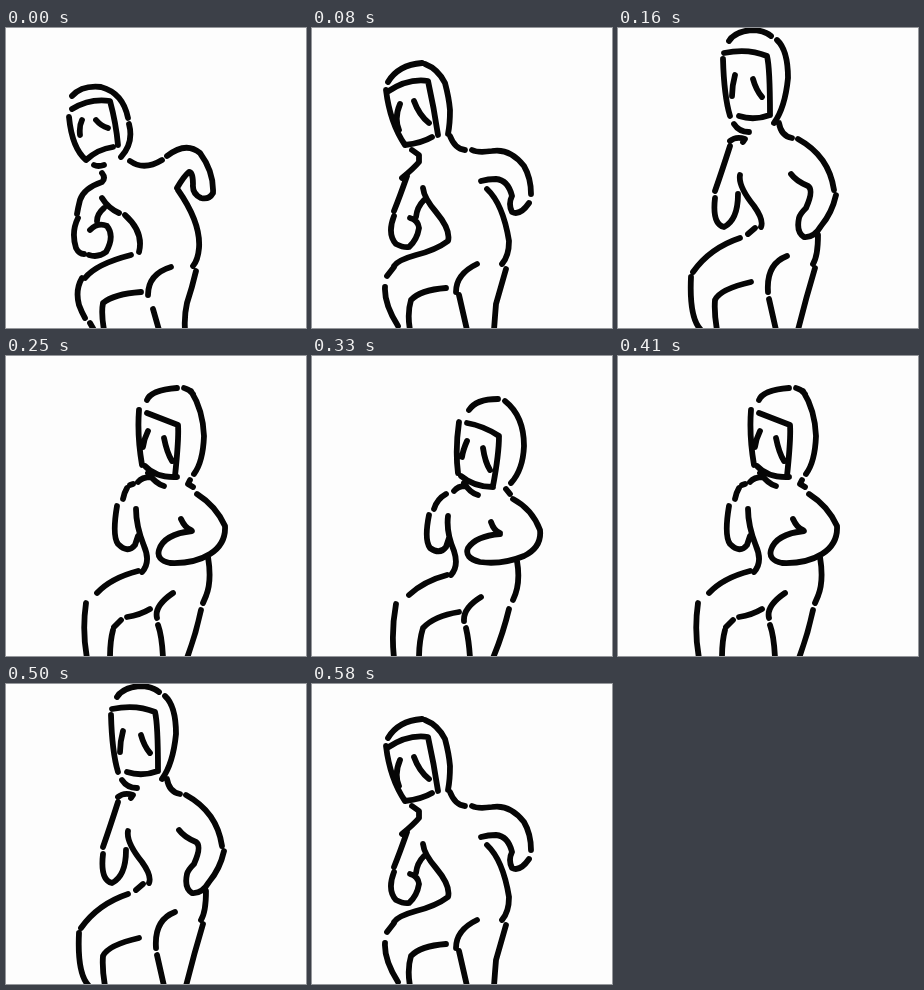
An HTML page for the animation above (0.66 s loop, 300x300 px).

```html
<!DOCTYPE html>
<html lang="en">
<head>
<meta charset="utf-8">
<title>Dancer</title>
<style>
  html, body { margin: 0; width: 100%; height: 100%; overflow: hidden; background: #fdfdfd; }
  svg { display: block; width: 100%; height: 100%; }
  path { fill: none; stroke: #060606; stroke-width: 5.8; stroke-linecap: round; stroke-linejoin: round; }
</style>
</head>
<body>
<svg viewBox="0 0 300 300"><path id="figure"/></svg>
<script>
const join = (...strokes) => strokes.join(' ');

// Each pose: head, arms and torso, legs.
const poses = [
  join(
    'M66 68Q76 57 95 59Q117 65 122 90M123 96Q128 115 115 129',
    'M66 81Q84 70 104 73Q110 95 112 117M63 89Q66 120 80 132Q92 121 107 119',
    'M76 92Q73 98 74 107M90 92Q95 98 102 100M88 137Q92 139 98 137',
    'M96 145Q100 150 96 154Q78 160 74 172Q72 180 71 186M72 190Q65 204 70 220Q73 226 78 226',
    'M84 202Q92 194 101 198Q109 208 100 224Q92 230 83 227',
    'M96 170Q102 180 113 185M98 180Q91 186 91 193M119 187Q138 204 133 224',
    'M124 133Q138 143 156 132',
    'M161 128Q180 113 194 125Q208 144 207 165Q203 172 195 170Q186 166 187 156Q187 144 183 144Q178 148 171 160',
    'M172 162Q195 195 193 220Q192 232 187 238',
    'M125 227Q90 236 79 250M76 250Q69 262 73 277Q76 285 79 290M84 295L88 302',
    'M135 264Q108 266 97 275Q95 285 98 302M165 239Q142 246 142 267M147 281L153 302',
    'M190 243Q186 260 181 275Q178 288 179 302'
  ),
  join(
    'M76 54Q86 37 110 35M113 36Q126 41 133 55Q137 70 138 82Q138 96 136 106',
    'M75 64Q96 50 116 53Q122 80 126 107M74 62Q78 95 93 117Q110 115 120 109',
    'M88 76Q82 90 87 102M102 73Q107 87 117 95M138 108Q143 121 153 122',
    'M100 122L107 127L107 134Q102 140 90 150M95 148Q88 168 82 183',
    'M82 188Q75 206 84 216Q92 220 97 219Q105 212 107 200Q106 192 98 190',
    'M111 160Q112 170 124 184Q139 202 136 213Q124 222 104 227Q86 232 82 238M82 239L75 248M112 172Q105 179 104 189',
    'M160 122Q166 125 180 123Q198 120 212 138Q219 150 219 166',
    'M217 175Q208 188 200 184Q196 176 200 168Q196 152 184 151Q176 151 169 153',
    'M175 161Q191 176 197 213Q197 228 190 236M194 241L184 276Q183 288 182 302',
    'M73 259Q72 276 86 298M134 260Q108 262 99 272Q95 285 98 302',
    'M165 236Q144 246 144 264M147 267L155 302'
  ),
  join(
    'M111 13Q116 4 133 2Q146 2 153 8M159 12Q170 22 170 50Q167 80 156 95',
    'M106 25Q130 20 149 28Q152 40 152 87M105 31Q106 68 112 88M121 88Q136 93 152 87',
    'M117 47Q114 58 114 68M135 51Q138 62 144 69',
    'M116 96Q121 104 131 104M161 95Q163 108 174 110M112 113Q118 108 127 111L125 114',
    'M112 118Q104 143 97 163M97 170Q94 196 106 199Q120 192 120 166',
    'M122 147Q120 158 136 178Q146 192 143 199M137 200L130 206',
    'M180 111Q211 128 216 162',
    'M218 167Q214 185 203 198Q196 210 186 209Q178 204 181 190Q182 186 188 180Q196 162 190 158Q178 153 173 146',
    'M200 207Q200 228 195 236M197 240Q188 270 180 302',
    'M122 210Q92 220 75 244M73 249Q71 290 83 302',
    'M133 254Q102 261 97 272Q96 285 99 302M169 228Q148 236 150 264M151 271L158 302'
  ),
  join(
    'M141 44Q145 34 171 32M178 32Q183 33 187 38M185 35Q197 54 198 80Q197 106 188 118',
    'M141 57L172 69Q173 82 169 120M133 54Q131 80 136 109M139 110Q150 122 171 121',
    'M142 75Q138 83 137 91M158 82Q161 97 166 105',
    'M142 117Q150 128 158 130M132 126Q136 121 145 121M184 124L182 128L187 131',
    'M124 129L127 128M121 132Q118 137 117 143',
    'M111 150Q106 180 112 188Q122 198 129 189L132 180',
    'M130 153Q130 170 138 190Q145 206 136 216',
    'M191 138Q210 150 219 170Q220 188 204 198Q188 208 164 207Q150 204 153 194Q158 178 186 175M175 163Q179 172 185 174',
    'M202 201Q206 225 200 240L197 247M195 254Q190 278 181 302',
    'M132 215Q105 222 91 237M80 247Q76 275 81 302',
    'M144 253Q134 259 121 261M115 264L108 271M107 274Q104 285 104 302',
    'M167 237Q148 250 151 262M152 269Q156 280 157 302'
  ),
  join(
    'M157 54Q164 43 186 43M193 45Q212 60 212 90Q211 114 199 127',
    'M155 67Q172 70 187 80Q187 98 181 130M147 66Q143 94 146 117M149 120Q162 131 181 131',
    'M155 85Q151 94 150 101M171 92Q173 106 178 114',
    'M152 127Q158 137 166 139M142 135Q146 130 153 130M194 133L198 138',
    'M134 138Q125 143 122 153M117 159Q112 184 118 192Q128 199 134 191L137 182',
    'M136 160Q134 176 142 195Q147 210 139 219',
    'M201 143Q220 153 228 174Q230 191 212 200Q190 209 168 206Q152 202 156 192Q164 180 188 178M179 166Q182 175 188 177',
    'M205 205Q209 228 201 244M197 253Q191 278 181 302',
    'M135 219Q112 225 97 239M84 248Q79 275 82 302',
    'M147 256Q122 260 111 272Q107 285 107 302M169 241Q151 252 152 265M154 272Q157 285 158 302'
  )
];

const LOOP = 660;
const starts = [0, 80, 160, 250, 330, 410, 500, 580];
const figure = document.getElementById('figure');
const t0 = performance.now();
let shown = -1;

function draw(now) {
  const t = Math.max(0, now - t0) % LOOP;
  const step = starts.filter(s => s <= t).length - 1;
  const pose = 4 - Math.abs(4 - step); // sway out and back
  if (pose !== shown) figure.setAttribute('d', poses[shown = pose]);
  requestAnimationFrame(draw);
}
draw(t0);
</script>
</body>
</html>
```
